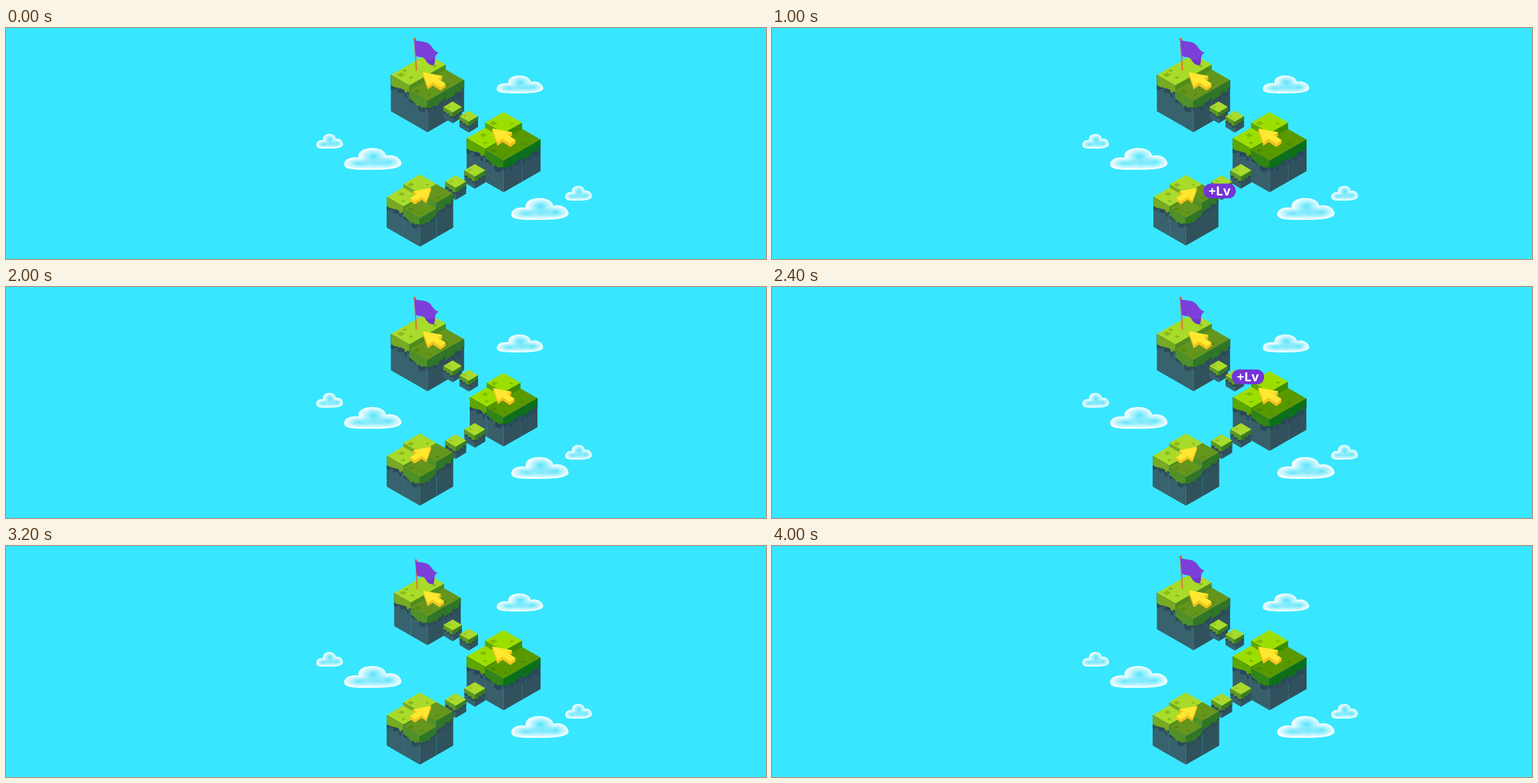
Write an HTML page with a canvas that moves like this. It is 1180 px wide and 360 px high and loops after 4.1 s.

```html
<!DOCTYPE html>
<html lang="en">
<head>
<meta charset="utf-8">
<title>Floating islands</title>
<style>
html, body { margin: 0; width: 100%; height: 100%; overflow: hidden; background: #38e7ff; }
canvas { display: block; }
</style>
</head>
<body>
<canvas id="stage" width="1180" height="360"></canvas>
<script>
const ctx = document.getElementById('stage').getContext('2d');
const LOOP = 4100, STEP = 100, PULSE = 1200, TAU = Math.PI * 2;
const CELL_W = 28.7, CELL_H = 16.5;

const lime = { top: '#a8db2a', dark: '#64961d', left: '#76aa24', right: '#4f8c1f',
  frontL: '#4f9129', frontR: '#2f7626', stoneL: '#38626d', stoneR: '#30525d', fringe: '#2c4a58' };
const vivid = { top: '#9bde00', dark: '#589900', left: '#5da600', right: '#3c8c00',
  frontL: '#2f8516', frontR: '#0c701b', stoneL: '#395f6b', stoneR: '#30515d', fringe: '#28475c' };

// left and right: heights of the raised side cells
const islands = [
  { x: 642.7, y: 261.6, size: .9, start: 0, look: lime, left: 4, right: 10, tip: [19, -14], flip: -1 },
  { x: 772.6, y: 168, size: 1, start: 1300, look: vivid, left: 2, right: 0, tip: [-17.5, -11.5], flip: 1 },
  { x: 654.4, y: 75.3, size: .99, start: 2600, look: lime, left: 8, right: 0, tip: [-7.5, -6.5], flip: 1, flag: true }
];

const badges = [
  { x: 695, y: 254, from: 300, to: 1300 },
  { x: 739, y: 140, from: 2050, to: 2850 },
  { x: 700.8, y: 63.3, from: 3418, to: 4000 }
];

const clouds = [
  [798, 88, .81, .82], [569.5, 204, 1, 1], [502.5, 176.5, .465, .68],
  [829, 282, 1, 1], [889, 257.5, .465, .68]
];

function poly(points, fill) {
  ctx.beginPath();
  points.forEach(p => ctx.lineTo(p[0], p[1]));
  ctx.closePath();
  ctx.fillStyle = fill;
  ctx.fill();
}

function seeded(seed) {
  return () => (seed = (seed * 16807) % 2147483647) / 2147483647;
}

// Isometric grid: i runs to the lower right, j to the lower left, z is up.
const iso = (i, j, z) => [(i - j) * CELL_W, (i + j) * CELL_H - 27 - z];

function tile(i0, j0, i1, j1, z, fill) {
  poly([iso(i0, j0, z), iso(i1, j0, z), iso(i1, j1, z), iso(i0, j1, z)], fill);
}

function wall(a, b, z0, z1, fill) {
  poly([iso(...a, z1), iso(...b, z1), iso(...b, z0), iso(...a, z0)], fill);
}

function box(i0, j0, i1, j1, z, top, left, right) {
  tile(i0, j0, i1, j1, z, top);
  wall([i0, j1], [i1, j1], 0, z, left);
  wall([i1, j1], [i1, j0], 0, z, right);
}

// Grass hanging over a stone wall in uneven columns.
function drips(a, b, z, depth, spread, seed, fill) {
  const rnd = seeded(seed), n = 8, pts = [iso(...a, z), iso(...b, z)];
  const at = k => [a[0] + (b[0] - a[0]) * k / n, a[1] + (b[1] - a[1]) * k / n];
  for (let k = n; k > 0; k--) {
    const low = z - depth - spread * rnd();
    pts.push(iso(...at(k), low), iso(...at(k - 1), low));
  }
  poly(pts, fill);
}

function side(a, b, z, stone, grass, fringe, seed) {
  wall(a, b, -49, z, stone);
  drips(a, b, z, 14, 10, seed + 40, fringe);
  drips(a, b, z, 11, 7, seed, grass);
}

function spots(list, z) {
  list.forEach(([i, j, s]) => tile(i, j, i + s, j + s, z, 'rgba(55,105,0,.27)'));
}

function arrow(x, y, flip) {
  const shape = [[0, 0], [31, 6], [24, 10], [36, 18], [28, 24], [16, 16], [8, 22]];
  const shifted = d => shape.map(p => [p[0], p[1] + d]);
  ctx.save();
  ctx.translate(x, y);
  ctx.scale(flip, 1);
  for (let d = 5; d > 0; d -= .5) poly(shifted(d), '#f3c21f');
  poly(shape, '#ffe82f');
  ctx.restore();
}

function flag() {
  ctx.strokeStyle = '#dd7b35';
  ctx.lineWidth = 2.4;
  ctx.beginPath();
  ctx.moveTo(-20, -58);
  ctx.lineTo(-17.5, -9);
  ctx.stroke();
  ctx.beginPath();
  ctx.moveTo(-21, -58);
  ctx.bezierCurveTo(-14, -54, -8, -56, -1, -53);
  ctx.bezierCurveTo(8, -49, 7, -41, 17.5, -37);
  ctx.bezierCurveTo(9, -33, 14, -25, 10, -17.5);
  ctx.bezierCurveTo(2, -17, -1, -22, -4, -27);
  ctx.bezierCurveTo(-8, -33, -13, -28, -18.5, -33);
  ctx.closePath();
  ctx.fillStyle = '#7c3fda';
  ctx.fill();
  ctx.beginPath();
  ctx.moveTo(-3, -26);
  ctx.quadraticCurveTo(7, -23, 11.5, -29);
  ctx.quadraticCurveTo(12, -23, 10, -17.5);
  ctx.quadraticCurveTo(1, -18, -3, -26);
  ctx.fillStyle = '#6c36c8';
  ctx.fill();
  ctx.beginPath();
  ctx.arc(-20, -58.5, 2.2, 0, TAU);
  ctx.fillStyle = '#d9663f';
  ctx.fill();
}

function island(it, t) {
  const c = it.look, u = Math.min(1, Math.max(0, (t - it.start) / PULSE));
  const s = it.size * (1 - .045 * (1 - Math.cos(TAU * u)));
  ctx.save();
  ctx.translate(it.x, it.y);
  ctx.scale(s, s);
  tile(0, 0, 2, 2, 0, c.dark);
  if (it.flag) {
    box(0, 0, 1, 2, it.left, c.top, c.left, c.right);
    spots([[.15, 1.6, .22], [.1, 1.35, .14], [.6, 1.5, .14], [.7, .3, .14]], it.left);
  } else {
    box(0, 0, 1, 1, 10, c.top, c.left, c.right);
    spots([[.15, .7, .22], [.7, .25, .12]], 10);
    box(1, 0, 2, 1, it.right, c.dark, c.frontL, c.frontR);
    box(0, 1, 1, 2, it.left, c.top, c.left, c.right);
    wall([0, 1], [1, 1], it.left, 10, c.left);
    spots([[.2, 1.3, .2], [.65, 1.65, .13]], it.left);
  }
  spots([[1.65, .6, .15]], it.right);
  spots([[1.15, 1.7, .2], [1.7, 1.6, .12]], 0);
  side([0, 2], [1, 2], it.left, c.stoneL, c.left, c.fringe, 57);
  side([1, 2], [2, 2], 0, c.stoneL, c.frontL, c.fringe, 71);
  side([2, 2], [2, 1], 0, c.stoneR, c.frontR, c.fringe, 93);
  side([2, 1], [2, 0], it.right, c.stoneR, c.frontR, c.fringe, 35);
  if (it.flag) flag();
  arrow(...it.tip, it.flip);
  ctx.restore();
}

function stone(x, y, s) {
  const L = [-16.3, 9.7], R = [16.3, 9.7], F = [0, 19.4], B = [0, 38.5];
  ctx.save();
  ctx.translate(x, y);
  ctx.scale(s, s);
  poly([L, F, B, [-16.3, 28.8]], lime.stoneL);
  poly([R, F, B, [16.3, 28.8]], lime.stoneR);
  for (const [dir, grass] of [[-1, '#5d9923'], [1, '#397c24']]) {
    for (const [drop, fill] of [[9, lime.fringe], [6, grass]]) {
      const pts = [F, [16.3 * dir, 9.7]];
      for (let k = 6; k > 0; k--) {
        const d = drop + (k * 7 % 5) * .8;
        pts.push([16.3 * dir * k / 6, 19.4 - 9.7 * k / 6 + d],
          [16.3 * dir * (k - 1) / 6, 19.4 - 9.7 * (k - 1) / 6 + d]);
      }
      poly(pts, fill);
    }
  }
  poly([[0, 0], R, F, L], lime.top);
  poly([[-7, 7], [-3, 9.3], [-7, 11.6], [-11, 9.3]], '#97c727');
  ctx.restore();
}

function tint(x, y, rx, ry, alpha) {
  ctx.save();
  ctx.translate(x, y);
  ctx.scale(rx, ry);
  const g = ctx.createRadialGradient(0, 0, 0, 0, 0, 1);
  g.addColorStop(0, `rgba(56,222,250,${alpha})`);
  g.addColorStop(1, 'rgba(56,222,250,0)');
  ctx.fillStyle = g;
  ctx.fillRect(-1, -1, 2, 2);
  ctx.restore();
}

function cloud(x, y, sx, sy) {
  ctx.save();
  ctx.translate(x, y);
  ctx.scale(sx, sy);
  ctx.beginPath();
  ctx.moveTo(-44.5, 8);
  ctx.bezierCurveTo(-44, 0, -33, -4, -22, -2);
  ctx.bezierCurveTo(-24, -13, -11, -17, -1, -17);
  ctx.bezierCurveTo(10, -17, 19, -13, 21, -5);
  ctx.bezierCurveTo(33, -8, 44, -1, 44.5, 7);
  ctx.bezierCurveTo(44, 15, 24, 17, 0, 17);
  ctx.bezierCurveTo(-24, 17, -45, 18, -44.5, 8);
  ctx.fillStyle = '#f6feff';
  ctx.fill();
  ctx.clip();
  tint(1, -4, 21, 13, .85);
  tint(-22, 7, 22, 9, .75);
  tint(4, 7, 28, 10, .65);
  tint(25, 5, 19, 10, .75);
  ctx.restore();
}

function badge(b, t) {
  const alpha = Math.min(1, (t - b.from) / 200, (b.to - t) / 200);
  if (alpha <= 0) return;
  ctx.save();
  ctx.globalAlpha = alpha;
  ctx.translate(b.x, b.y);
  ctx.beginPath();
  ctx.arc(-13.5, 0, 11.6, Math.PI / 2, Math.PI * 1.5);
  ctx.arc(13.5, 0, 11.6, -Math.PI / 2, Math.PI / 2);
  ctx.closePath();
  ctx.fillStyle = '#7334d6';
  ctx.fill();
  ctx.fillStyle = '#fff';
  ctx.font = 'bold 20px "Noto Sans", "Open Sans", sans-serif';
  ctx.textAlign = 'center';
  ctx.fillText('+Lv', -.3, 7);
  ctx.restore();
}

function draw(t) {
  ctx.fillStyle = '#38e7ff';
  ctx.fillRect(0, 0, 1180, 360);
  clouds.forEach(c => cloud(...c));
  island(islands[2], t);
  stone(693.5, 114.5, .88);
  stone(718.5, 129, .88);
  island(islands[1], t);
  stone(728, 212, 1);
  stone(698.2, 229.5, 1);
  island(islands[0], t);
  badges.forEach(b => badge(b, t));
}

function tick(now) {
  draw(Math.floor((now % LOOP) / STEP) * STEP);
  requestAnimationFrame(tick);
}
draw(0);
requestAnimationFrame(tick);
</script>
</body>
</html>
```
